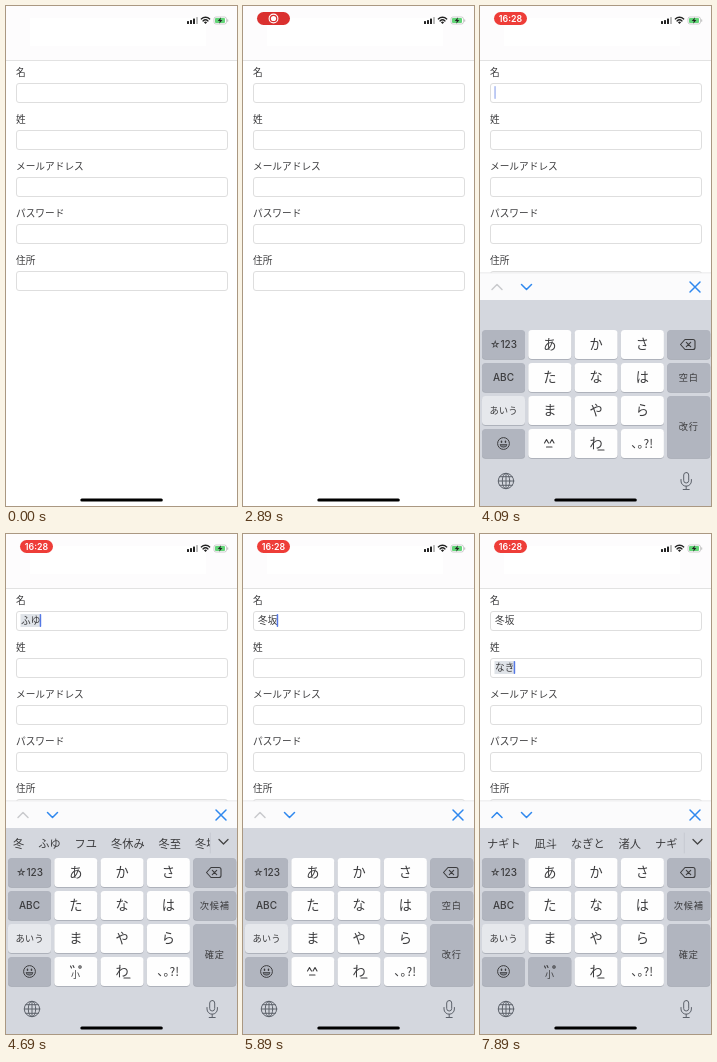
Write an HTML page that moves like this. It is 231 px wide and 500 px high and loops after 8 s.

```html
<!DOCTYPE html>
<html lang="ja">
<head>
<meta charset="utf-8">
<title>Form input</title>
<style>
  html, body { margin: 0; width: 100%; height: 100%; overflow: hidden; background: #fff; }
  svg { display: block; width: 100%; height: 100%; }
  text { font-family: "Noto Sans CJK JP", "Noto Sans CJK", "Noto Sans", sans-serif; fill: #3c3c3e; }
  .mid { text-anchor: middle; }
  .latin { font-family: Inter, "Noto Sans CJK JP", sans-serif; }
  .key { font-weight: 500; }
  .side { letter-spacing: .8px; }
  .line { fill: none; stroke-linecap: round; stroke-linejoin: round; }
</style>
</head>
<body>
<svg id="stage" viewBox="0 0 231 500">
  <defs><clipPath id="barClip"><rect x="0" y="294" width="204" height="30"/></clipPath></defs>
  <rect width="231" height="500" fill="#fff"/>
  <rect width="231" height="54" fill="#fdfcfd"/>
  <rect x="24" y="12" width="176" height="28" fill="#fff"/>
  <rect y="54" width="231" height="1" fill="#e2e2e2"/>

  <g id="pill">
    <rect id="pillBg" x="14" y="6" width="33" height="13" rx="6.5"/>
    <g id="rec">
      <circle cx="30.5" cy="12.5" r="4.4" fill="none" stroke="#fff" stroke-width="1.1"/>
      <circle cx="30.5" cy="12.5" r="2.6" fill="#fff"/>
    </g>
    <text id="clock" class="mid latin" x="30.5" y="15.7" font-size="8.8" font-weight="600" style="fill:#fff">16:28</text>
  </g>

  <g fill="#222">
    <rect x="181" y="15" width="2" height="3" rx=".5"/>
    <rect x="184" y="14" width="2" height="4" rx=".5"/>
    <rect x="187" y="12.5" width="2" height="5.5" rx=".5"/>
    <rect x="190" y="11" width="2" height="7" rx=".5" fill="#bbb"/>
    <path d="M199.5 18 l-1.6 -1.8 a2.3 2.3 0 0 1 3.2 0 z"/>
  </g>
  <g class="line" stroke="#222" stroke-width="1.4">
    <path d="M197 14.9 a3.7 3.7 0 0 1 5 0"/>
    <path d="M195.3 12.9 a6.2 6.2 0 0 1 8.4 0"/>
  </g>
  <rect x="208" y="11" width="12.5" height="7" rx="2" fill="#fff" stroke="#bbb" stroke-width=".7"/>
  <rect x="209" y="12" width="10" height="5" rx="1" fill="#62d577"/>
  <rect x="221.2" y="13.3" width="1" height="2.5" rx=".5" fill="#bbb"/>
  <path d="M215 11.3 l-3.2 3.7 h2 l-.6 2.7 l3.2 -3.7 h-2 z" fill="#222"/>

  <g id="form"></g>
  <rect id="mark" height="13" fill="#dfe3e8"/>
  <g id="values"></g>
  <rect id="caret" width="1.5" height="13" rx=".7" fill="#5578e4"/>

  <g id="board">
    <rect y="267" width="231" height="27" fill="#fbfbfc"/>
    <rect y="266.5" width="231" height=".8" fill="#e4e4e6"/>
    <rect y="294" width="231" height="350" fill="#d4d7de"/>
    <g class="line" stroke="#2f88ee" stroke-width="1.5">
      <path id="up" d="M12 283.5 l5 -5 l5 5"/>
      <path d="M41.5 278.5 l5 5 l5 -5"/>
      <path d="M210 276 l10 10 m0 -10 l-10 10"/>
    </g>
    <g id="bar" clip-path="url(#barClip)"></g>
    <g id="more" class="line">
      <path d="M213 305.5 l4.5 4.5 l4.5 -4.5" stroke="#444" stroke-width="1.3"/>
      <path d="M204.3 299 v20" stroke="#c3c7ce" stroke-width=".8"/>
    </g>
    <g id="keys"></g>
    <path class="line" stroke="#3c3c3e" stroke-width="1.1" d="M205 333.5 h8 a2 2 0 0 1 2 2 v6 a2 2 0 0 1 -2 2 h-8 l-4.5 -5 z M206.3 336.3 l4.4 4.4 m0 -4.4 l-4.4 4.4"/>
    <g fill="#3c3c3e">
      <circle cx="23.5" cy="437.5" r="5.9" fill="none" stroke="#3c3c3e"/>
      <ellipse cx="21.5" cy="435.7" rx=".8" ry="1.2"/>
      <ellipse cx="25.5" cy="435.7" rx=".8" ry="1.2"/>
      <path d="M20 438.5 h7 a3.5 2.7 0 0 1 -7 0 z" fill="#777b82" stroke="#3c3c3e" stroke-width=".7"/>
    </g>
    <g class="line" stroke="#5d626b" stroke-width="1">
      <circle cx="26" cy="475" r="7.7"/>
      <ellipse cx="26" cy="475" rx="3.7" ry="7.7"/>
      <path d="M26 467.3 v15.4 M18.3 475 h15.4 M19.8 470.7 h12.4 M19.8 479.3 h12.4"/>
      <rect x="203.7" y="466.5" width="5" height="10.5" rx="2.5"/>
      <path d="M201 473.5 v1.5 a5.2 5.2 0 0 0 10.4 0 v-1.5 M206.2 480.2 v3.3 M203.2 483.5 h6"/>
    </g>
  </g>
  <rect x="74.3" y="492.4" width="82.5" height="3" rx="1.5" fill="#000"/>
</svg>
<script>
const LOOP = 8000, SIZE = 9.7, CAND = 11.2;
const $ = id => document.getElementById(id);

function add(parent, tag, attrs, text) {
  const el = document.createElementNS("http://www.w3.org/2000/svg", tag);
  for (const k in attrs) el.setAttribute(k, attrs[k]);
  if (text) el.textContent = text;
  parent.appendChild(el);
  return el;
}
const show = (el, on) => el.setAttribute("visibility", on ? "inherit" : "hidden");

// Form
const fieldY = i => 77 + 47 * i;
["名", "姓", "メールアドレス", "パスワード", "住所"].forEach((label, i) => {
  add($("form"), "text", { x: 10, y: fieldY(i) - 7.3, "font-size": SIZE }, label);
  add($("form"), "rect", { x: 10.5, y: fieldY(i) + .5, width: 211, height: 19, rx: 2.5, fill: "#fff", stroke: "#dedede" });
});
const values = [0, 1].map(i => add($("values"), "text", { x: 15, y: fieldY(i) + 13.2, "font-size": SIZE }));

// Keyboard
const WHITE = "#fefefe", GRAY = "#b1b5bf", keys = {};
const rows = [
  ["☆123", "あ", "か", "さ", ""],
  ["ABC", "た", "な", "は", "空白"],
  ["あいう", "ま", "や", "ら", "改行"],
  ["", "mark", "わ", "､｡?!", null]
];
rows.forEach((row, r) => row.forEach((name, c) => {
  if (name === null) return;
  const x = 2 + 46.3 * c, y = 324 + 33 * r, side = c === 0 || c === 4;
  const h = name === "改行" ? 62 : 29;
  const box = { x, y, width: 43, height: h, rx: 3.5 };
  add($("keys"), "rect", { ...box, y: y + .8, fill: "#a3a7b0" });
  const fill = name === "あいう" ? "#e6e8ec" : side ? GRAY : WHITE;
  const face = add($("keys"), "rect", { ...box, fill });
  const size = side ? (c ? 9.2 : name === "あいう" ? 9.4 : 10) : name === "､｡?!" ? 12 : 13.2;
  const label = add($("keys"), "text", {
    x: x + 21.5, y: y + h / 2 + size * .37, "font-size": size,
    class: "mid key " + (c === 4 ? "side" : c ? "" : "latin")
  }, name === "mark" ? "" : name);
  if (name) keys[name] = { face, label };
}));
const line = { class: "line", stroke: "#3c3c3e", "stroke-width": 1.1 };
add($("keys"), "path", { ...line, d: "M118 444 h6" });
const smile = add($("keys"), "path", { ...line, d: "M64.5 437 l2 -3.5 l2 3.5 m1.5 0 l2 -3.5 l2 3.5 M66.500 441 h5.500" });
const small = add($("keys"), "g", {});
add(small, "text", { x: 69.5, y: 444.3, "font-size": 9, class: "mid key" }, "小");
add(small, "path", { ...line, d: "M64.5 432 l1 2 m1.500 -2.500 l1 2" });
add(small, "circle", { ...line, cx: 74, cy: 433, r: 1.2 });

// Each step: time and the properties that change from there on
const names = ["フユサカ", "冬坂", "ふゆさか", "冬至", "フユ"];
const given = ["ナギト", "凪斗", "なぎと", "渚人", "ナギ"];
const steps = [
  [0, { pill: 0, clock: false, dy: 240, field: -1, a: "", b: "", typing: false, cand: [], key: "", caret: 1 }],
  [100, { pill: .4 }], [290, { pill: .75 }], [490, { pill: 1 }],
  [3090, { clock: true, dy: 135, field: 0 }],
  [3290, { dy: 9 }], [3490, { dy: 0 }],
  [3890, { caret: 0 }], [4090, { caret: .5 }],
  [4290, { a: "ふ", typing: true, key: "は", caret: 1, cand: ["不", "ふ", "フ", "風", "府", "部", "夫", "付"] }],
  [4490, { a: "ふゆ", key: "や", cand: ["冬", "ふゆ", "フユ", "冬休み", "冬至", "冬場"] }],
  [4690, { key: "" }],
  [4890, { a: "ふゆさ", key: "さ", cand: ["冬さ", "ふゆさ", "フユサ", "冬さん", "冬"] }],
  [5090, { a: "ふゆさか", key: "か", cand: names }],
  [5290, { key: "" }],
  [5890, { a: "冬坂", typing: false, cand: [] }],
  [6490, { caret: .4 }],
  [6690, { field: 1, caret: 1 }],
  [7490, { b: "な", typing: true, key: "な", cand: ["な", "名", "ナ", "何", "夏", "無", "中", "菜"] }],
  [7690, { b: "なき", key: "", cand: ["泣き", "なき", "ナキ", "無き", "亡き", "鳴き"] }],
  [7890, { cand: given, key: "mark" }]
];

let lastBar;
function drawBar(words) {
  if (words === lastBar) return;
  lastBar = words;
  $("bar").replaceChildren();
  let x = 7;
  for (const w of words) {
    add($("bar"), "text", { x, y: 314.2, "font-size": CAND }, w);
    x += w.length * CAND + 14;
  }
}

function draw(t) {
  const s = {};
  for (const [at, change] of steps) if (t >= at) Object.assign(s, change);

  $("pill").setAttribute("opacity", s.pill);
  $("pillBg").setAttribute("fill", s.clock ? "#ee3d38" : "#da302f");
  show($("rec"), !s.clock);
  show($("clock"), s.clock);

  values[0].textContent = s.a;
  values[1].textContent = s.b;
  const text = s.field === 1 ? s.b : s.a, end = text.length * SIZE;
  const top = fieldY(Math.max(s.field, 0)) + 3;
  const mark = $("mark");
  mark.setAttribute("x", 14.5);
  mark.setAttribute("y", top);
  mark.setAttribute("width", end);
  show(mark, s.typing);
  $("caret").setAttribute("x", 14.3 + end);
  $("caret").setAttribute("y", top);
  $("caret").setAttribute("opacity", s.field < 0 ? 0 : s.caret);

  $("board").setAttribute("transform", `translate(0 ${s.dy})`);
  $("up").setAttribute("stroke", s.field === 1 ? "#2f88ee" : "#c9cacd");
  drawBar(s.cand);
  show($("more"), s.typing);
  show(smile, !s.typing);
  show(small, s.typing);
  keys["空白"].label.textContent = s.typing ? "次候補" : "空白";
  keys["改行"].label.textContent = s.typing ? "確定" : "改行";
  for (const k of ["か", "さ", "な", "は", "や", "mark"])
    keys[k].face.setAttribute("fill", s.key === k ? GRAY : WHITE);
}

const start = performance.now();
function tick() {
  draw((performance.now() - start) % LOOP);
  requestAnimationFrame(tick);
}
tick();
</script>
</body>
</html>
```
